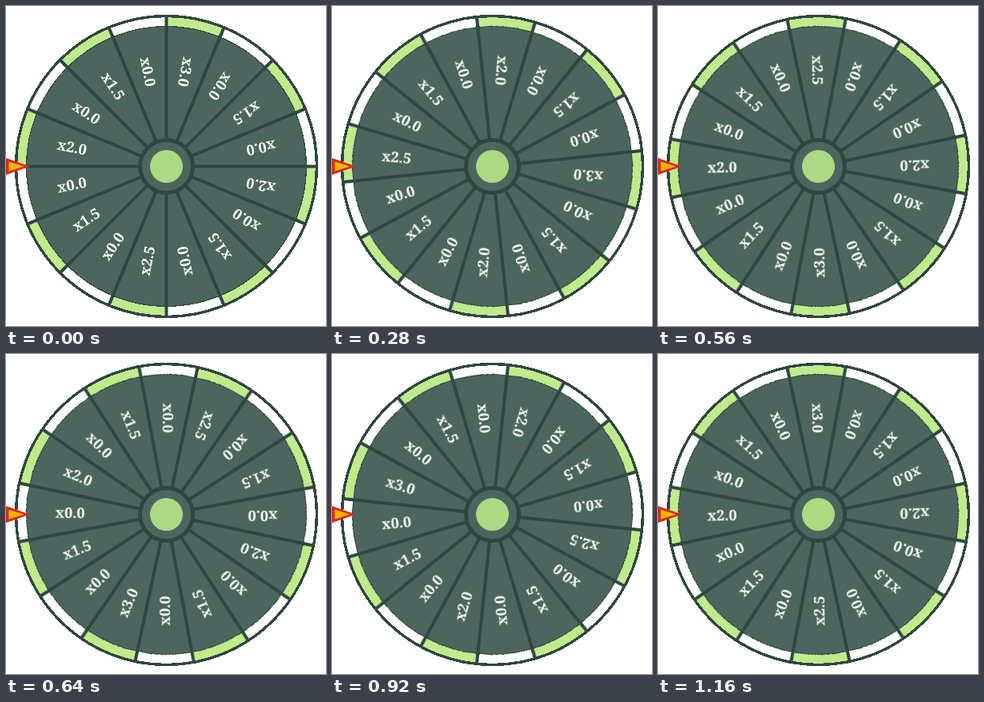
These frames come from a looping animation (400x400 px, 1200 ms). An HTML page:

```html
<!DOCTYPE html>
<html lang="en">
<head>
<meta charset="utf-8">
<title>Prize wheel</title>
<style>
  html, body { margin: 0; width: 100%; height: 100%; overflow: hidden; background: #fff; }
  svg { display: block; width: 100vw; height: 100vh; }
  #wheel { transform-origin: 0 0; }
  .crisp { shape-rendering: crispEdges; }
  text { font: 900 18px "Noto Serif", serif; fill: #fff; text-anchor: middle; }
</style>
</head>
<body>
<svg viewBox="0 0 400 400">
  <g transform="translate(200.5 200.5)">
    <g id="wheel"></g>
    <circle class="crisp" r="188" fill="none" stroke="#2f4641" stroke-width="3.4"/>
    <circle r="33" fill="#4c665f" stroke="#2f4641" stroke-width="5"/>
    <circle r="20.5" fill="#abda83"/>
  </g>
  <path d="M0 190 L30 200.5 L0 211 Z" fill="#dc281e"/>
  <path d="M3.5 194.5 L22.5 200.5 L3.5 206.5 Z" fill="#ffb400"/>
</svg>
<script>
  const NS = 'http://www.w3.org/2000/svg';
  const wheel = document.getElementById('wheel');
  const prizes = ['3.0', '1.5', '2.0', '1.5', '2.5', '1.5', '2.0', '1.5'];
  const labels = prizes.flatMap(p => ['x' + p, 'x0.0']);
  const SLICE = 360 / labels.length;
  const RIM = 187, DISC = 175;
  const DARK = '#2f4641';

  function add(tag, attrs, content = '') {
    const el = document.createElementNS(NS, tag);
    for (const k in attrs) el.setAttribute(k, attrs[k]);
    el.textContent = content;
    wheel.append(el);
  }

  // Angles run clockwise from the top.
  function point(r, deg) {
    const a = deg * Math.PI / 180;
    return `${r * Math.sin(a)} ${-r * Math.cos(a)}`;
  }

  labels.forEach((_, i) => add('path', {
    d: `M0 0 L${point(RIM, i * SLICE)} A${RIM} ${RIM} 0 0 1 ${point(RIM, (i + 1) * SLICE)} Z`,
    fill: i % 2 ? '#fff' : '#c0eb8b'
  }));
  add('circle', { class: 'crisp', r: DISC, fill: '#4c665f', stroke: DARK, 'stroke-width': 1.2 });
  labels.forEach((label, i) => {
    add('line', { y1: -34, y2: -RIM, stroke: DARK, 'stroke-width': 4, transform: `rotate(${i * SLICE})` });
    add('text', { x: -120.5, y: 6, transform: `rotate(${(i + 0.5) * SLICE + 90})` }, label);
  });

  wheel.animate(
    [{ transform: 'rotate(0deg)' }, { transform: 'rotate(360deg)' }],
    { duration: 1200, iterations: Infinity, easing: 'steps(30, end)' }
  );
</script>
</body>
</html>
```
